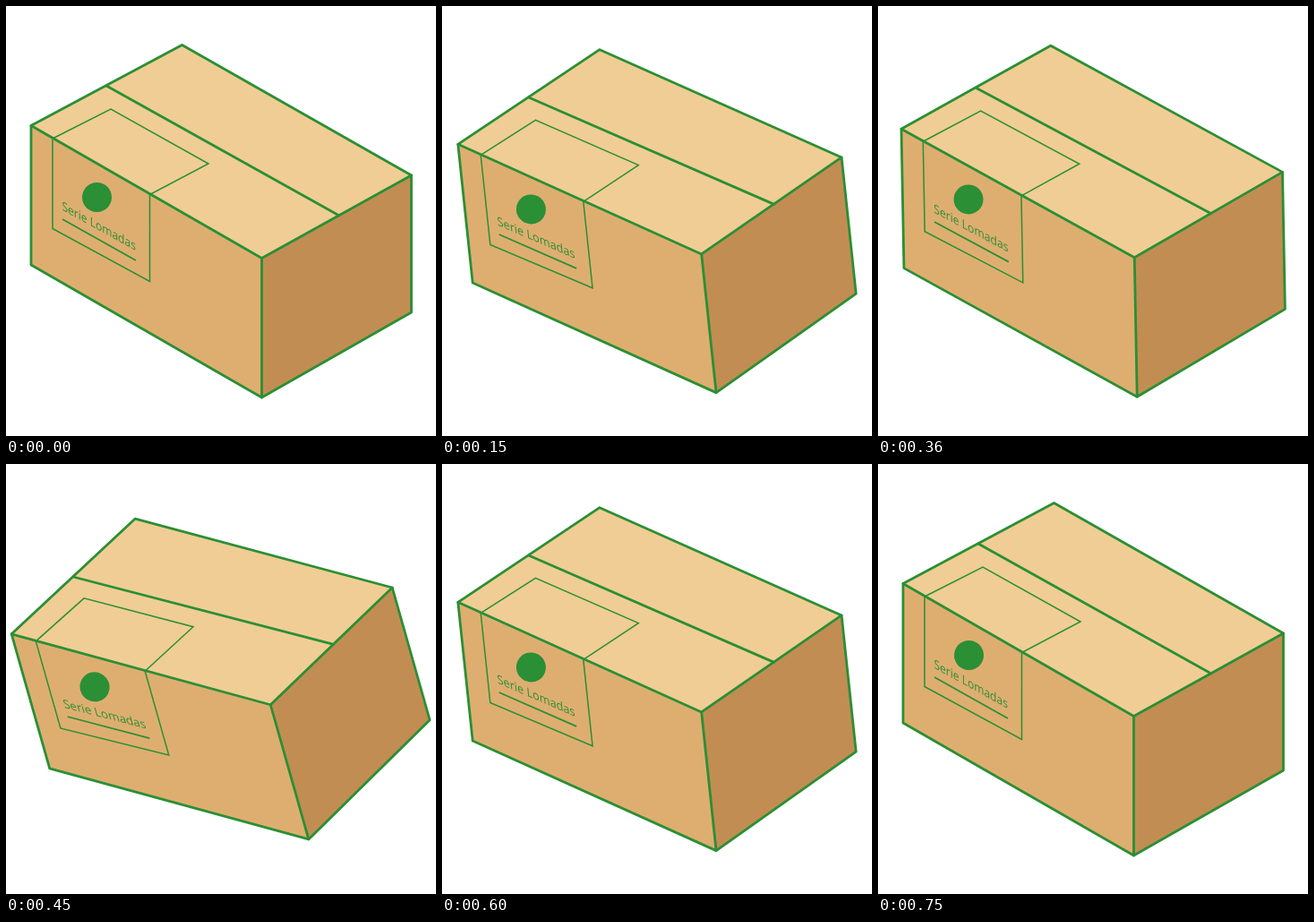
Recreate the animation shown at these times as an HTML page. Size 480 by 480 pixels, loop 1.38 s.

```html
<!DOCTYPE html>
<html lang="es">
<head>
<meta charset="utf-8">
<title>Swaying box</title>
<style>
  html, body { margin: 0; width: 100%; height: 100%; overflow: hidden; background: #fff; }
  svg { display: block; width: 100%; height: 100%; }
  .edge { fill: none; stroke: #2a8f35; stroke-width: 2.8; stroke-linejoin: round; stroke-linecap: round; }
  .thin { stroke-width: 1.5; stroke-linejoin: miter; }
  text { font: 13.9px "Open Sans", "Noto Sans", sans-serif; }
</style>
</head>
<body>
<svg viewBox="0 0 480 480">
  <g id="box">
    <path fill="#f0cd94" d="M196.5 43.5 452.5 189 285.5 281.5 28 133.5Z"/>
    <path fill="#deae70" d="M28 133.5 285.5 281.5V437L28 289Z"/>
    <path fill="#c28d53" d="M285.5 281.5 452.5 189V342L285.5 437Z"/>
    <path class="edge thin" d="M52 148 117 115 226 176 160.5 210.5V307.5L52 248.5Z M52 148V248.5"/>
    <path class="edge" d="M196.5 43.5 452.5 189V342L285.5 437 28 289V133.5Z"/>
    <path class="edge" d="M28 133.5 285.5 281.5 452.5 189M285.5 281.5V437M112 89 372 234"/>
    <g fill="#2a8f35">
      <circle cx="101.5" cy="213.5" r="16.5"/>
      <text transform="matrix(.866 .48 0 1 62.5 227.5)">Serie Lomadas</text>
    </g>
    <path class="edge" style="stroke-width:1.8;stroke-linecap:butt" d="M63 238 145 284"/>
  </g>
</svg>
<script>
  const LOOP = 1380;   // ms, sway plus rest
  const STEP = 30;     // ms per pose
  const STEPS = 25;    // poses until the box rests
  const SWAYS = 4;
  const TILT = 16.7;   // degrees at the far end of a sway
  const STRETCH = 1.05;
  const box = document.getElementById("box");

  function draw(ms) {
    const step = Math.min(STEPS, Math.floor((ms % LOOP) / STEP));
    const phase = step / STEPS * SWAYS * 2 * Math.PI;
    const angle = -TILT * (1 - Math.cos(phase)) / 2;
    // The turn happens in a slightly widened space.
    box.setAttribute("transform",
      `translate(240 240) scale(${STRETCH} 1) rotate(${angle}) scale(${1 / STRETCH} 1) translate(-240 -240)`);
  }

  let start;
  function tick(now) {
    start ??= now;
    draw(now - start);
    requestAnimationFrame(tick);
  }
  draw(0);
  requestAnimationFrame(tick);
</script>
</body>
</html>
```
